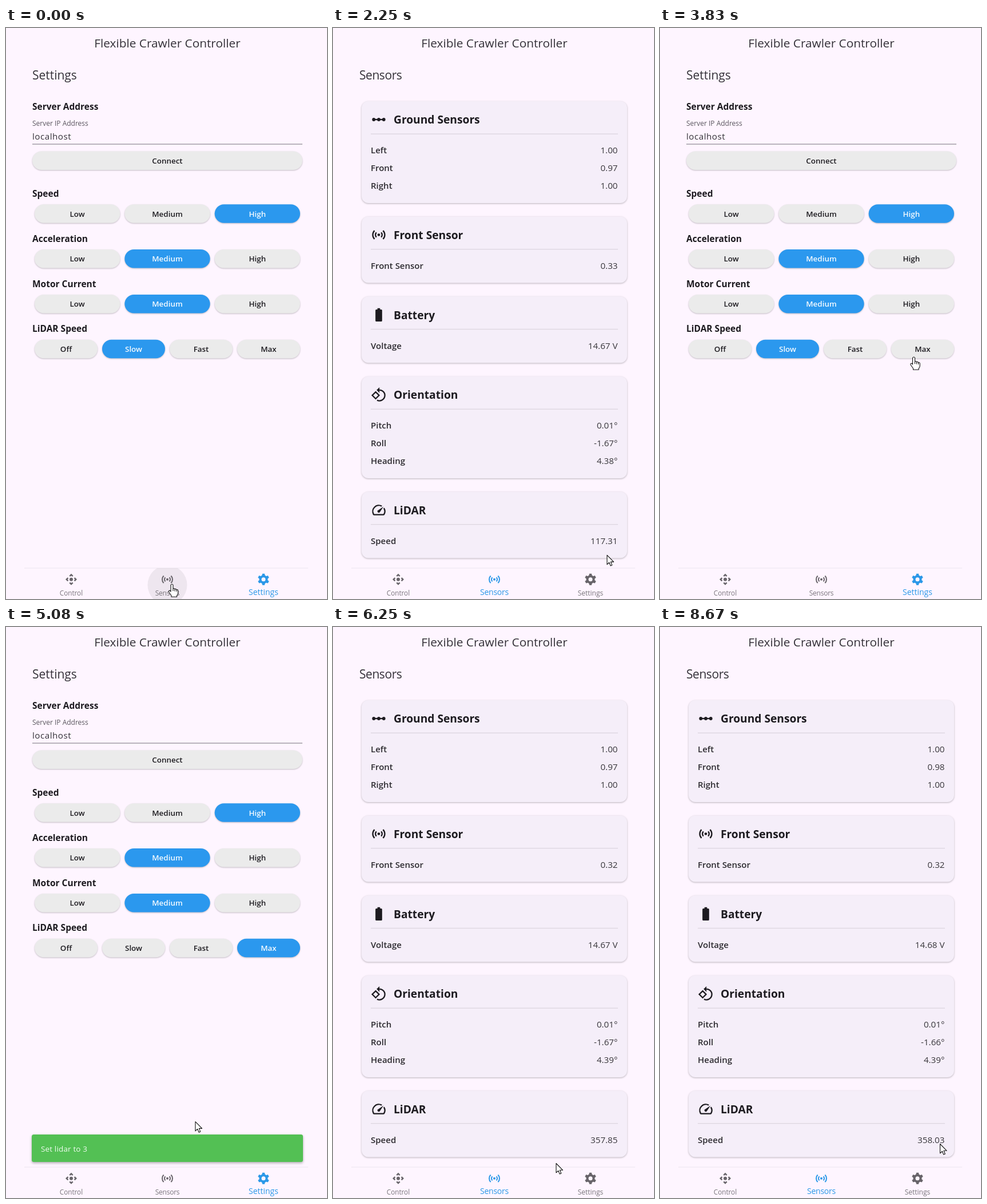
Animation of 561 by 998 pixels, one loop 8830 ms. Source, as an HTML page:

```html
<!DOCTYPE html>
<html lang="en">
<head>
<meta charset="utf-8">
<title>Robot control panel</title>
<style>
html, body { margin: 0; width: 100%; height: 100%; overflow: hidden; background: #fef5ff; }
svg { display: block; width: 100%; height: 100%; }
#stage { font-family: "Open Sans", "Noto Sans", sans-serif; fill: #1d1b20; }
.mid { text-anchor: middle; }
.end { text-anchor: end; }
.head { font-size: 21px; fill: #343238; }
.group { font-size: 15.5px; font-weight: 700; }
.hint { font-size: 12px; fill: #5b575f; }
.field { font-size: 15.2px; letter-spacing: .5px; fill: #343238; }
.btn rect { fill: #ebebeb; filter: drop-shadow(0 1px 1px rgba(0,0,0,.24)); }
.btn text { font-size: 13.4px; font-weight: 600; }
.btn.on rect { fill: #2b98ee; }
.btn.on text { fill: #f4faff; }
.card { fill: #f5eef9; filter: drop-shadow(0 1.5px 1.5px rgba(0,0,0,.27)); }
.title { font-size: 19.2px; font-weight: 700; }
.name { font-size: 15px; font-weight: 600; fill: #2d2b30; }
.value { font-size: 15.2px; fill: #38363b; }
.rule { fill: #ded7e1; }
.toast rect { fill: #53c054; filter: drop-shadow(0 2px 2px rgba(0,0,0,.3)); }
.toast text { font-size: 13.5px; letter-spacing: .15px; fill: #effbef; }
.line { fill: none; stroke: currentColor; stroke-width: 2; }
.icon { fill: currentColor; color: #1d1b20; }
.pointer path { fill: #fff; stroke: #111; stroke-width: 1.1; stroke-linejoin: round; }
</style>
</head>
<body>
<svg viewBox="0 0 561 998"><g id="stage"></g></svg>
<script>
const LOOP = 8830, STEP = 1000 / 12;
const $ = id => document.getElementById(id);
const text = (x, y, s, cls, attr = '') => `<text x="${x}" y="${y}" class="${cls}" ${attr}>${s}</text>`;
const turn = (shape, n) => Array.from({ length: n }, (_, i) =>
  `<g transform="rotate(${360 / n * i} 12 12)">${shape}</g>`).join('');

// Icons on a 24-unit grid
const icons = {
  control: turn('<path d="M12 2l3.54 3.54-1.77 1.76L12 5.54 10.23 7.3 8.46 5.54z"/>', 4) + '<circle cx="12" cy="12" r="3"/>',
  sensors: '<circle cx="12" cy="12" r="2"/><path class="line" d="M8.46 8.46a5 5 0 0 0 0 7.08M15.54 8.46a5 5 0 0 1 0 7.08M5.64 5.64a9 9 0 0 0 0 12.72M18.36 5.64a9 9 0 0 1 0 12.72"/>',
  settings: '<circle cx="12" cy="12" r="5.5" fill="none" stroke="currentColor" stroke-width="4"/>' +
    turn('<path d="M9.2 6L10 2h4l.8 4z"/>', 6),
  ground: '<path class="line" d="M4 12h16"/>' + [4.5, 12, 19.5].map(x => `<circle cx="${x}" cy="12" r="2.5"/>`).join(''),
  battery: '<path d="M10 2h4v2h1.7q1.3 0 1.3 1.3v15.4q0 1.3-1.3 1.3H8.3Q7 22 7 20.7V5.3Q7 4 8.3 4H10z"/>',
  rotate: '<path class="line" d="M7.34 7.83l5.07 5.07-5.07 5.07-5.07-5.07zM13 5a8 8 0 1 1-3.6 15.1"/><path d="M13 .76V9.24L8.76 5z"/>',
  gauge: '<path class="line" d="M16.5 6.25A9 9 0 0 0 4.2 18.5q.3.5.9.5h13.8q.6 0 .9-.5a9 9 0 0 0-.2-9.4"/><path d="M19.08 6.92l-5.66 8.49a2 2 0 0 1-2.83-2.83z"/>'
};
const icon = (name, cx, cy, size, id = '') =>
  `<g class="icon" id="${id}" transform="translate(${cx - size / 2} ${cy - size / 2}) scale(${size / 24})">${icons[name]}</g>`;

const button = (x, y, w, s, on, id = '') =>
  `<g class="btn${on ? ' on' : ''}" id="${id}"><rect x="${x}" y="${y}" width="${w}" height="32.5" rx="16.2"/>` +
  text(x + w / 2, y + 21.2, s, 'mid') + '</g>';

const choices = [
  ['Speed', ['Low', 'Medium', 'High'], 2],
  ['Acceleration', ['Low', 'Medium', 'High'], 1],
  ['Motor Current', ['Low', 'Medium', 'High'], 1],
  ['LiDAR Speed', ['Off', 'Slow', 'Fast', 'Max'], 1]
];
const choiceRow = ([name, opts, on], i) => {
  const y = 308.3 + 78.8 * i, pitch = 472 / opts.length;
  return text(46, y - 13.3, name, 'group') +
    opts.map((s, j) => button(50 + pitch * j, y, pitch - 8, s, j === on, i === 3 ? s : '')).join('');
};

const settingsPage = text(46, 89.7, 'Settings', 'head') +
  text(46, 142.7, 'Server Address', 'group') +
  text(46, 170.7, 'Server IP Address', 'hint') +
  text(46, 194.5, 'localhost', 'field') +
  '<rect x="46" y="202.5" width="472" height="1" fill="#77737a"/>' +
  button(46, 215.5, 472, 'Connect') + choices.map(choiceRow).join('');

const cards = [
  [128, 'ground', 'Ground Sensors', ['Left', 'Front', 'Right']],
  [329.5, 'sensors', 'Front Sensor', ['Front Sensor']],
  [469.3, 'battery', 'Battery', ['Voltage']],
  [609, 'rotate', 'Orientation', ['Pitch', 'Roll', 'Heading']],
  [810.5, 'gauge', 'LiDAR', ['Speed']]
];
const card = ([y, pic, title, rows]) =>
  `<rect class="card" x="50" y="${y}" width="464" height="${85 + 31 * rows.length}" rx="12"/>` +
  icon(pic, 80, y + 32, 28) + text(106, y + 39.3, title, 'title') +
  `<rect class="rule" x="66" y="${y + 56.5}" width="432" height="1.4"/>` +
  rows.map((s, i) => text(66, y + 91.3 + 31 * i, s, 'name') +
    text(497.5, y + 91.3 + 31 * i, '', 'value end', `id="${s}"`)).join('');

const sensorsPage = text(46, 89.7, 'Sensors', 'head', 'letter-spacing="-.45"') + cards.map(card).join('');

const tabs = ['Control', 'Sensors', 'Settings'], tabX = [114, 282, 450];
const nav = '<rect x="32" y="943.5" width="496" height="1" fill="#eee6ef"/>' +
  `<clipPath id="bar"><rect x="32" y="944" width="496" height="54"/></clipPath>
  <g clip-path="url(#bar)"><circle id="splash"/><circle id="hover" cy="973.5" r="34.5"/></g>` +
  tabs.map((s, i) => icon(s.toLowerCase(), tabX[i], 963.8, 24, 'pic' + i) +
    text(tabX[i], 992, s, 'mid', `id="tab${i}"`)).join('');

$('stage').innerHTML = '<rect width="561" height="998" fill="#fef5ff"/>' +
  text(282, 34, 'Flexible Crawler Controller', 'head mid', 'style="font-size:20.8px"') +
  `<g id="settings">${settingsPage}</g><g id="sensors">${sensorsPage}</g>${nav}
  <g id="toast" class="toast"><rect x="45" y="887" width="474" height="48" rx="3.5"/>${text(61, 916.8, 'Set lidar to 3', '')}</g>
  <g id="pointer" class="pointer">
    <path id="arrow" d="M0 0V16.3L3.7 12.8 6.2 18.6 8.8 17.5 6.4 11.8H11.6Z"/>
    <path id="hand" d="M-2 1.5Q0-1.6 2 1.5V8Q4 6.6 5 8.8 7 7.6 8 9.8 10.7 9 10.7 12V15.5Q10.7 18 8.6 20V22.3H-1V20L-5.3 14Q-6.4 11.3-4 11L-2 13ZM2 8V12M5 9V12.5M8 10V13"/>
  </g>`;

// Pointer tip: time, x, y
const route = [
  [0, 290, 972], [417, 290, 972], [583, 315, 958], [1000, 458, 907], [1167, 477, 903.5], [1500, 491, 903.5],
  [2083, 490, 905], [2583, 457, 954], [3083, 457, 954], [3667, 446, 600], [3833, 443.5, 575],
  [4000, 452, 566], [4333, 452, 566], [5083, 331, 864.5], [5417, 286, 970], [5833, 286, 970],
  [6250, 390, 937.5], [6583, 452, 913], [7000, 470, 908], [7167, 470, 908], [7750, 483, 906],
  [8250, 483, 906], [8667, 489.5, 903.5]
];
// Time, then front, range, volts, pitch, roll, heading, lidar
const readings = [
  [0, .97, .33, 14.68, 0, -1.67, 4.38, 117.28],
  [1250, .98, .33, 14.68, 0, -1.67, 4.38, 117.35],
  [1667, .97, .33, 14.68, .01, -1.67, 4.38, 117.28],
  [2167, .97, .33, 14.67, .01, -1.67, 4.38, 117.31],
  [5500, .97, .32, 14.67, .01, -1.67, 4.39, 357.85],
  [6667, .98, .32, 14.67, .01, -1.67, 4.39, 357.92],
  [8000, .98, .32, 14.68, .01, -1.66, 4.39, 358.03]
];
// Time of press, tab index
const clicks = [[-9999, 2], [167, 1], [2750, 2], [5583, 1]];

const clamp = v => Math.max(0, Math.min(1, v));
const mix = (a, b, p) => a + (b - a) * p;
const latest = (list, t) => list.filter(r => r[0] <= t + 1).pop();

function pointerAt(t) {
  const i = Math.max(1, route.findIndex(r => r[0] >= t));
  const b = t >= 8667 ? route[route.length - 1] : route[i], a = t >= 8667 ? b : route[i - 1];
  const p = b === a ? 0 : (t - a[0]) / (b[0] - a[0]);
  return [mix(a[1], b[1], p), mix(a[2], b[2], p)];
}

function drawPointer(t, page) {
  const [x, y] = pointerAt(t);
  const onBar = y > 944 && x > 32 && x < 528;
  const onMax = page === 2 && x > 404 && x < 514 && y > 545 && y < 577;
  const hand = onBar || onMax;
  $('pointer').setAttribute('transform', `translate(${x} ${y})`);
  $('hand').style.display = hand ? '' : 'none';
  $('arrow').style.display = hand ? 'none' : '';
  $('hover').setAttribute('cx', tabX[Math.max(0, Math.min(2, Math.floor((x - 32) / 165.3)))]);
  $('hover').setAttribute('fill-opacity', onBar ? .07 : 0);
}

function drawNav(t) {
  const now = latest(clicks, t), before = clicks[clicks.indexOf(now) - 1] || now;
  const p = clamp((t - now[0] - STEP) / 200);
  tabs.forEach((_, i) => {
    const k = i === now[1] ? (now === before ? 1 : p) : i === before[1] ? 1 - p : 0;
    const tint = [mix(104, 43, k), mix(100, 152, k), mix(106, 232, k)].map(Math.round).join();
    const tab = $('tab' + i);
    $('pic' + i).style.color = `rgb(${tint})`;
    tab.style.fill = `rgb(${tint})`;
    tab.style.fillOpacity = mix(.88, 1, k);
    tab.style.fontSize = mix(i ? 12 : 11.7, 14, k) + 'px';
    tab.style.letterSpacing = i === 1 ? '-.25px' : '0';
    tab.setAttribute('y', mix(992.4, 991.3, k));
  });
  const age = t - now[0], grow = clamp(age / 225), splash = $('splash');
  const [x, y] = pointerAt(Math.max(0, now[0]));
  splash.setAttribute('cx', mix(x, tabX[now[1]], grow));
  splash.setAttribute('cy', mix(y, 973, grow));
  splash.setAttribute('r', 20 + 90 * grow);
  splash.setAttribute('fill-opacity', .1 * (1 - clamp((age - 170) / 300)));
}

function drawValues(t) {
  const [, front, range, volts, pitch, roll, heading, lidar] = latest(readings, t).map((v, i) => i ? v.toFixed(2) : v);
  const shown = {
    Left: '1.00', Front: front, Right: '1.00', 'Front Sensor': range, Voltage: volts + ' V',
    Pitch: pitch + '°', Roll: roll + '°', Heading: heading + '°', Speed: lidar
  };
  for (const id in shown) $(id).textContent = shown[id];
}

function draw(t) {
  const page = latest(clicks, t - STEP)[1];
  $('settings').style.display = page === 2 ? '' : 'none';
  $('sensors').style.display = page === 1 ? '' : 'none';
  const max = t > 4160;
  $('Max').classList.toggle('on', max);
  $('Slow').classList.toggle('on', !max);
  const toast = clamp((t - 4167) / 250) * (1 - clamp((t - 5417) / 250));
  $('toast').style.opacity = toast;
  drawNav(t);
  drawValues(t);
  drawPointer(t, page);
}

const start = performance.now();
let last = -1;
function tick() {
  const t = Math.max(0, performance.now() - start) % LOOP;
  const step = Math.min(105, Math.floor((t + 5) / STEP));
  if (step !== last) draw((last = step) * STEP);
  requestAnimationFrame(tick);
}
tick();
</script>
</body>
</html>
```
